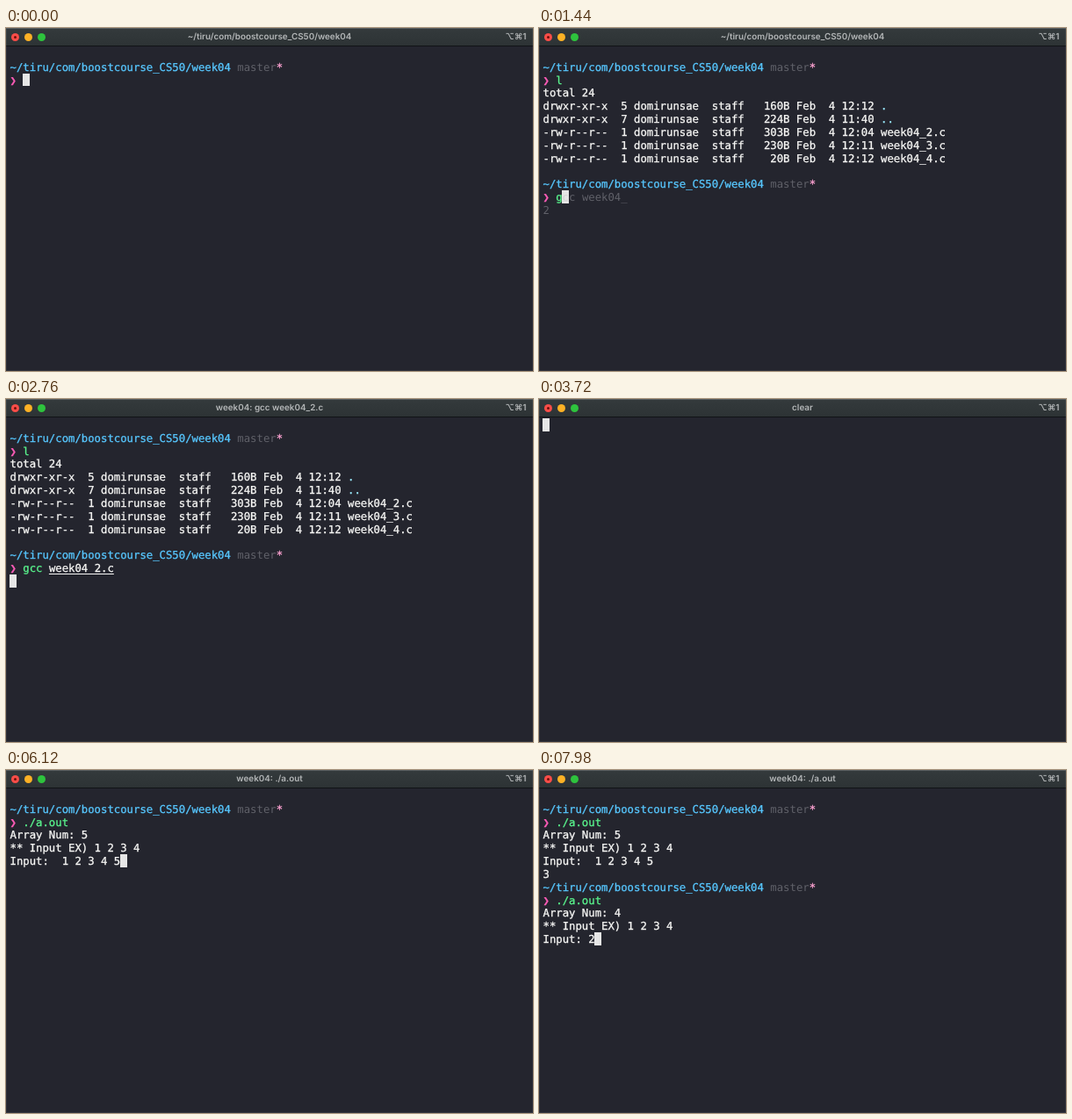
Animation of 600x391 px, one loop 8 s. Source, as an HTML page:

```html
<!DOCTYPE html>
<html lang="en">
<head>
<meta charset="utf-8">
<title>Terminal session</title>
<style>
  html, body { margin: 0; width: 100%; height: 100%; overflow: hidden; background: #24252e; }
  #window { position: relative; width: 600px; height: 391px; overflow: hidden; text-rendering: geometricPrecision; }
  #window::after {
    content: ""; position: absolute; inset: 0;
    box-shadow: inset 0 1px rgba(255, 255, 255, .12), inset 0 0 0 1px rgba(255, 255, 255, .07);
  }
  #bar {
    position: absolute; inset: 0 0 auto; height: 20px; border-bottom: 1px solid #111316;
    background: linear-gradient(#343a3c, #2d3335);
    font: 600 9.87px/21px Inter, "DejaVu Sans", sans-serif; color: #b4b7b8; text-align: center;
  }
  #bar i { position: absolute; top: 6px; width: 9px; height: 9px; border-radius: 50%; }
  #bar i:first-of-type::after {
    content: ""; position: absolute; inset: 3px; border-radius: 50%; background: #6d0f0c;
  }
  #keys { position: absolute; right: 7.5px; top: 0; }
  #screen {
    position: absolute; left: 4.5px; top: 23px; margin: 0; color: #f8f8f6;
    font: 12.292px/14.82px "DejaVu Sans Mono", monospace; font-variant-ligatures: none;
    -webkit-text-stroke: .3px;
  }
  .path { color: #57c7ff; }
  .branch, .hint { color: #606169; -webkit-text-stroke: 0; }
  .dirty { color: #ffa3d3; }
  .mark { color: #ff5cb8; display: inline-block; width: 7.4px; }
  .good { color: #5af78e; }
  .bad { color: #ff5c57; }
  .dir { color: #9aedfe; }
  .file { text-decoration: underline 1px; text-underline-offset: 2px; text-decoration-skip-ink: none; }
  .cursor {
    display: inline-block; position: relative; top: -1px; vertical-align: top;
    width: 8px; height: 14.82px; line-height: 16.82px; margin: 0 -.1px 0 -.5px;
    background: #e6e6e6; color: #d2d2d2; -webkit-text-stroke: 0;
  }
</style>
</head>
<body>
<div id="window">
  <div id="bar">
    <i style="left:6px;background:#fb4d48"></i>
    <i style="left:21px;background:#fdb125"></i>
    <i style="left:36px;background:#2ec33d"></i>
    <span id="title"></span><span id="keys">⌥⌘1</span>
  </div>
  <pre id="screen"></pre>
</div>
<script>
const LOOP = 8000;
const cwd = '~/tiru/com/boostcourse_CS50/week04';
const known = ['l', 'g', 'gc', 'gcc', 'clear', './a.out'];

const span = (name, text) => `<span class="${name}">${text}</span>`;
const prompt = `\n${span('path', cwd)} ${span('branch', 'master')}${span('dirty', '*')}\n${span('mark', '❯')} `;

const entry = (mode, links, size, time, name) =>
  `${mode}  ${links} domirunsae  staff  ${size.padStart(5)} Feb  4 ${time} ${name}\n`;
const listing = 'total 24\n' +
  entry('drwxr-xr-x', 5, '160B', '12:12', span('dir', '.')) +
  entry('drwxr-xr-x', 7, '224B', '11:40', span('dir', '..')) +
  entry('-rw-r--r--', 1, '303B', '12:04', 'week04_2.c') +
  entry('-rw-r--r--', 1, '230B', '12:11', 'week04_3.c') +
  entry('-rw-r--r--', 1, '20B', '12:12', 'week04_4.c');

const states = [];
let log = '', title = cwd;

// Record the screen from this time on; the cursor may cover the start of a hint.
function show(time, typed = '', hint = '') {
  const covered = hint && hint[0] !== '\n' ? hint[0] : ' ';
  const rest = covered === ' ' ? hint : hint.slice(1);
  states.push({ time, title, html: log + typed + span('cursor', covered) + span('hint', rest) });
}

function print(time, text, newTitle = title) {
  log += text;
  title = newTitle;
  show(time);
}

function paint(command) {
  const [name, arg] = command.split(' ');
  const head = span(known.includes(name) ? 'good' : 'bad', name);
  return arg === undefined ? head : `${head} ${span(arg ? 'file' : '', arg)}`;
}

function edit(suggestion, steps) {
  for (const [time, text] of steps) {
    show(time, paint(text), suggestion.startsWith(text) ? suggestion.slice(text.length) : '');
  }
}

function typeInput(time, text, pace) {
  [...text].forEach((char, i) => print(time + i * pace, char));
}

const example = '\n** Input EX) 1 2 3 4\nInput: ';

print(0, prompt);
edit('l', [[540, 'l']]);
print(960, paint('l') + '\n');
print(1020, listing);
print(1140, prompt);

edit('gcc week04_\n2', [
  [1380, 'g'], [1560, 'gc'], [1620, 'gcc'], [1740, 'gcc '], [1800, 'gcc w'],
  [1920, 'gcc week04_'], [2100, 'gcc week04_2'], [2340, 'gcc week04_2.c'],
]);
print(2640, paint('gcc week04_2.c') + '\n', 'week04: gcc week04_2.c');
print(2820, prompt, cwd);

edit('clear', [[3000, 'c'], [3120, 'cl'], [3240, 'cle'], [3360, 'clea'], [3480, 'clear']]);
log = '';
print(3720, '', 'clear');
print(3780, prompt, cwd);

edit('./a.out', [[3840, '.'], [3900, './'], [4020, './a'], [4140, './a.out']]);
print(4320, paint('./a.out') + '\n', 'week04: ./a.out');
print(4380, 'Array Num: ');
print(4740, '5');
print(4920, example);
typeInput(5100, ' 1 2 3', 60);
typeInput(5940, ' 4 5', 60);
print(6360, '\n3');
print(6420, prompt, cwd);

edit('./a.out', [[6900, '.'], [6960, './'], [7020, './a'], [7140, './a.out']]);
print(7200, paint('./a.out') + '\n', 'week04: ./a.out');
print(7260, 'Array Num: ');
print(7620, '4');
print(7800, example);
print(7980, '2');

const titleBox = document.getElementById('title');
const screenBox = document.getElementById('screen');
const start = performance.now();
let current;

function draw() {
  const time = (performance.now() - start) % LOOP;
  const state = states.findLast(s => s.time <= time) || states[0];
  if (state !== current) {
    current = state;
    titleBox.textContent = state.title;
    screenBox.innerHTML = state.html;
  }
  requestAnimationFrame(draw);
}
draw();
</script>
</body>
</html>
```
